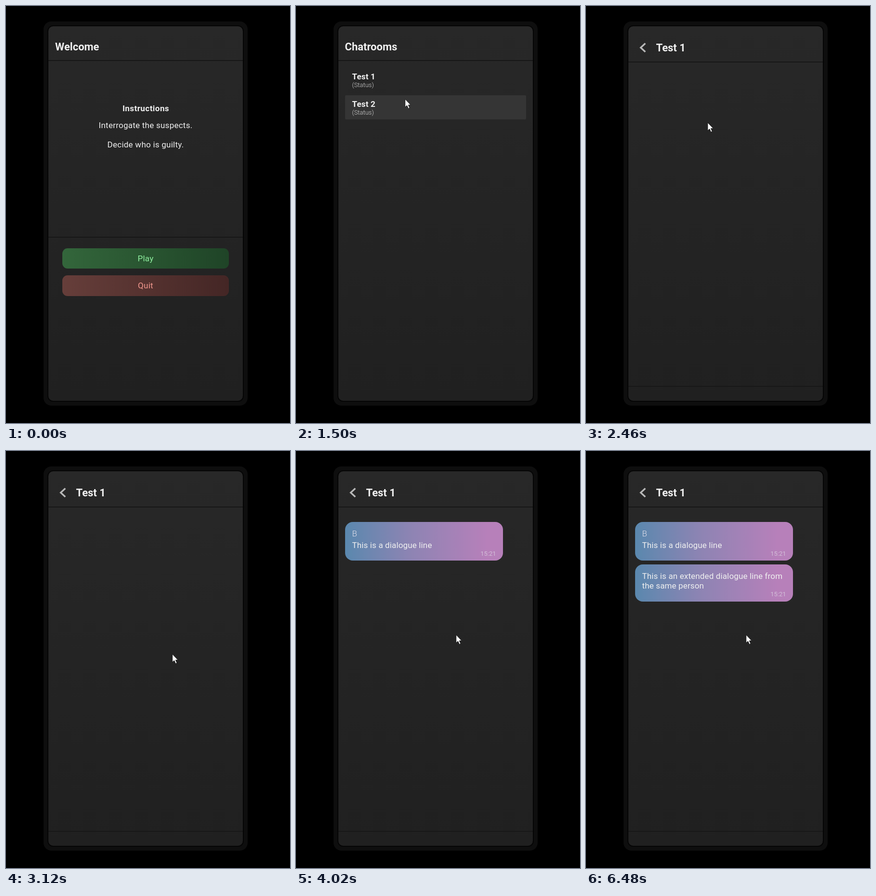
Write an HTML page that moves like this. It is 590x864 px and loops after 8000 ms.

```html
<!DOCTYPE html>
<html lang="en">
<head>
<meta charset="utf-8">
<title>Chat game</title>
<style>
  html, body { margin: 0; height: 100%; overflow: hidden; background: #000; }
  svg { display: block; width: 590px; height: 864px; }
  text { font: 17px Roboto, sans-serif; letter-spacing: .14px; fill: #f0f0f0; }
  .title { font-size: 22px; font-weight: 700; letter-spacing: 0; }
  .strong { font-weight: 700; }
  .center { text-anchor: middle; letter-spacing: .25px; }
  .center.strong { letter-spacing: .45px; }
  .small { font-size: 13px; font-weight: 300; letter-spacing: 0; fill: #d8d8d8; }
  .time { font-size: 13px; letter-spacing: 0; fill: #d3bfd9; text-anchor: end; }
  .sender { font-weight: 300; fill: #dfdfea; }
  .rule { fill: #171717; }
  .message > * { opacity: var(--shown); }
</style>
</head>
<body>
<svg viewBox="0 0 590 864">
  <defs>
    <linearGradient id="screen" x2="0" y2="1"><stop stop-color="#282828"/><stop offset="1" stop-color="#202020"/></linearGradient>
    <linearGradient id="green"><stop stop-color="#33663b"/><stop offset="1" stop-color="#1f4427"/></linearGradient>
    <linearGradient id="red"><stop stop-color="#663e3a"/><stop offset="1" stop-color="#442625"/></linearGradient>
    <linearGradient id="bubble"><stop stop-color="#5a88ae"/><stop offset=".4" stop-color="#8c84b3"/><stop offset=".9" stop-color="#b780ba"/></linearGradient>
    <clipPath id="clip"><rect x="88" y="42" width="404" height="776" rx="10"/></clipPath>
  </defs>
  <rect width="590" height="864"/>
  <rect x="78" y="32" width="424" height="796" rx="16" fill="#0e0e0e"/>
  <rect x="87" y="41" width="406" height="778" rx="11" fill="url(#screen)" stroke="#050505" stroke-width="2"/>

  <g clip-path="url(#clip)">
    <g id="welcome">
      <text class="title" x="102" y="92">Welcome</text>
      <rect class="rule" x="88" y="112" width="404" height="2"/>
      <text class="center strong" x="290.5" y="218">Instructions</text>
      <text class="center" x="290" y="253">Interrogate the suspects.</text>
      <text class="center" x="290" y="293">Decide who is guilty.</text>
      <rect class="rule" x="88" y="478" width="404" height="2"/>
      <rect x="117" y="502" width="346" height="42" rx="11" fill="url(#green)"/>
      <text class="center" x="290" y="529" style="fill:#8ff0a0">Play</text>
      <rect x="117" y="558" width="346" height="43" rx="11" fill="url(#red)"/>
      <text class="center" x="290" y="585" style="fill:#f2988e">Quit</text>
    </g>

    <g id="rooms">
      <text class="title" x="101.5" y="92">Chatrooms</text>
      <rect class="rule" x="88" y="112" width="404" height="2"/>
      <rect id="hover" x="102" width="376" height="50" rx="2" fill="#353535"/>
      <text class="strong" x="116.5" y="152">Test 1</text>
      <text class="small" x="116.5" y="168">(Status)</text>
      <text class="strong" x="116.5" y="209">Test 2</text>
      <text class="small" x="116.5" y="225">(Status)</text>
    </g>

    <g id="chat">
      <path d="M123.2 77.5l-9.5 8.7 9.5 8.7" fill="none" stroke="#b9b9b9" stroke-width="3.4"/>
      <text class="title" x="145.5" y="94">Test 1</text>
      <rect class="rule" x="88" y="115" width="404" height="2"/>
      <rect class="rule" x="88" y="787" width="404" height="2"/>
      <g id="first" class="message">
        <rect x="102" y="147" width="328" height="80" rx="16" fill="url(#bubble)"/>
        <text class="sender" x="116.5" y="177">B</text>
        <text x="116.5" y="201">This is a dialogue line</text>
        <text class="time" x="415.5" y="217">15:21</text>
      </g>
      <g id="second" class="message">
        <rect x="102" y="235" width="328" height="77" rx="16" fill="url(#bubble)"/>
        <text x="116.5" y="265">This is an extended dialogue line from</text>
        <text x="116.5" y="285">the same person</text>
        <text class="time" x="415.5" y="301">15:21</text>
      </g>
    </g>
  </g>
  <path id="cursor" d="M.7 0v16.5l3.8-3.4 2.9 6.4 2.7-1.2-2.8-6.2h5z" fill="#fff" stroke="#111" stroke-width=".9"/>
</svg>

<script>
const LOOP = 8000, STEP = 60;
const PLAY_CLICK = 1080;
const SLIDE = { start: 2005, length: 370, distance: 424 };
const MESSAGES = [["first", 3240], ["second", 6120]];
const FADE = 360, RISE = 8;

// Pointer path: time, x, y
const POINTER = [
  [540, 471, 527], [840, 352, 508], [1080, 345, 502], [1320, 293, 357],
  [1500, 226, 193], [1680, 204, 178], [1960, 187, 174], [2160, 188, 175],
  [2520, 265, 255], [2760, 300, 375], [3000, 323, 435], [3120, 345, 421],
  [3300, 345, 421], [4020, 332, 381]
];

const el = id => document.getElementById(id);
const progress = (t, start, length) => Math.min(1, Math.max(0, (t - start) / length));
const show = (id, on) => el(id).style.display = on ? "" : "none";
const move = (id, x, y) => el(id).setAttribute("transform", `translate(${x} ${y})`);

function pointerAt(t) {
  const next = POINTER.findIndex(p => p[0] > t);
  if (next < 0) return POINTER.at(-1).slice(1);
  const [t0, x0, y0] = POINTER[Math.max(0, next - 1)];
  const [t1, x1, y1] = POINTER[next];
  const k = progress(t, t0, t1 - t0 || 1);
  return [x0 + (x1 - x0) * k, y0 + (y1 - y0) * k];
}

function render(time) {
  const t = Math.floor(time / STEP) * STEP;
  const slide = progress(t, SLIDE.start, SLIDE.length);
  show("welcome", t < PLAY_CLICK);
  show("rooms", t >= PLAY_CLICK && slide < 1);
  show("chat", slide > 0);
  move("rooms", -SLIDE.distance * slide, 0);
  move("chat", SLIDE.distance * (1 - slide), 0);

  const [x, y] = pointerAt(t);
  show("cursor", t >= POINTER[0][0]);
  move("cursor", x, y);

  const row = [128, 185].find(top => y >= top && y <= top + 50);
  show("hover", row !== undefined);
  if (row !== undefined) el("hover").setAttribute("y", row);

  for (const [id, start] of MESSAGES) {
    const shown = progress(t, start, FADE);
    el(id).style.setProperty("--shown", shown);
    move(id, 0, RISE * (1 - shown));
  }
}

const begin = performance.now();
function tick() {
  render((performance.now() - begin) % LOOP);
  requestAnimationFrame(tick);
}
tick();
</script>
</body>
</html>
```
